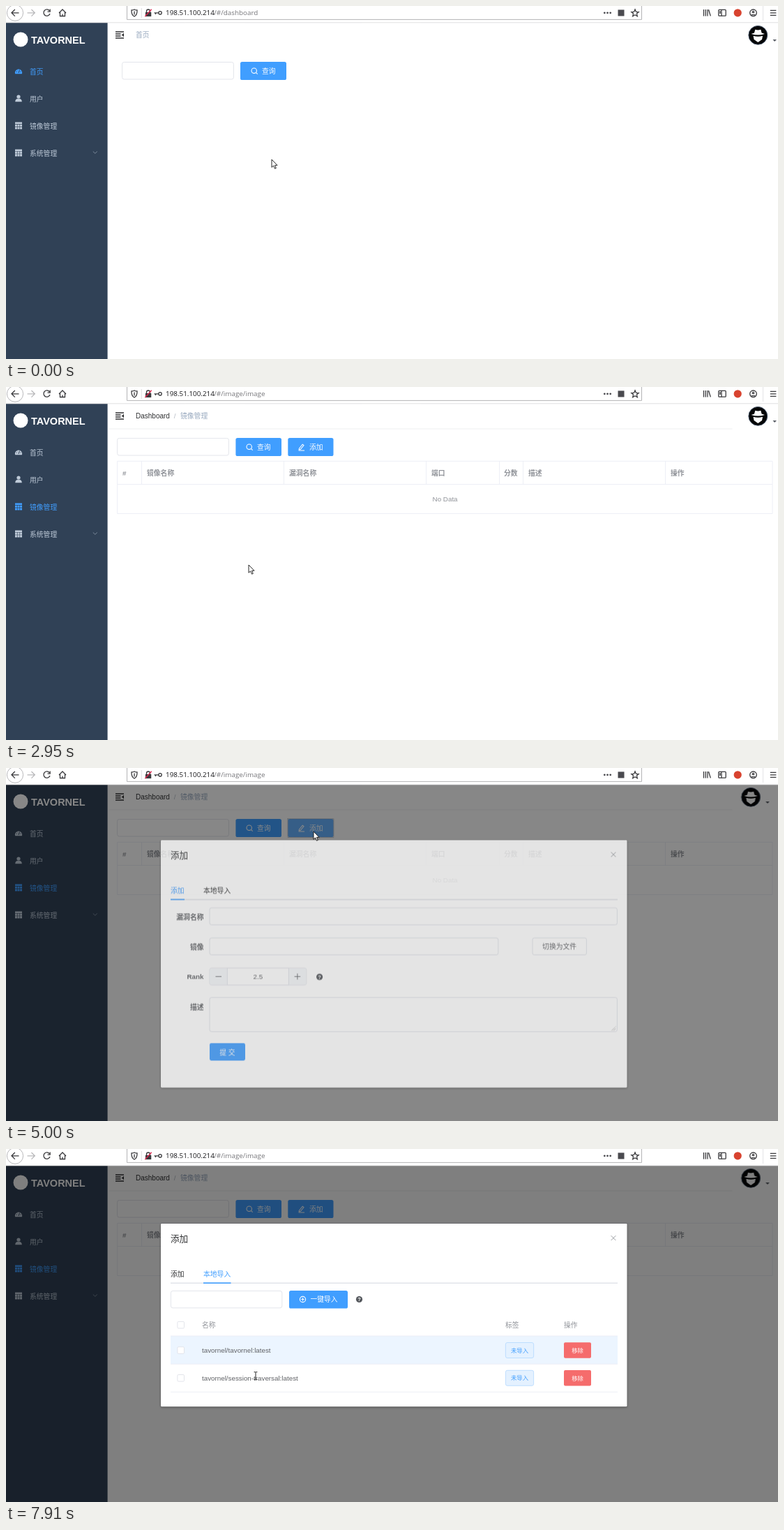
An HTML page that plays this animation: 1107x506 px, repeating every 8 s.

```html
<!DOCTYPE html>
<html lang="zh">
<head>
<meta charset="utf-8">
<title>镜像管理</title>
<style>
html, body { margin: 0; width: 100%; height: 100%; overflow: hidden; background: #fff; }
svg { display: block; }
text { font: 9.8px "Liberation Sans", "Noto Sans CJK SC", "Noto Sans CJK", sans-serif; fill: currentColor; white-space: pre; }
.url { font: 9.85px "Open Sans", sans-serif; }
.brand { font-size: 14.5px; font-weight: 700; }
.title { font-size: 12.6px; }
.small { font-size: 8.4px; }
.bold text { font-weight: 700; }
.mid { text-anchor: middle; }
.end text { text-anchor: end; }
.line { fill: none; stroke: currentColor; stroke-width: 1.1; }
.box { fill: #fff; stroke: #dcdfe6; stroke-width: .8; }
.btn { fill: #409eff; }
.rule { fill: none; stroke: #ebeef5; stroke-width: .9; }
.fill { fill: currentColor; }
.ink { color: #303133; } .body { color: #606266; } .mute { color: #909399; }
.crumb { color: #97a8be; } .blue { color: #409eff; } .white { color: #fff; }
.menu { color: #bfcbd9; }

/* Every animation is held still and placed by the clock through --now. */
.k { animation: 8s step-end infinite paused; animation-delay: var(--now, 0s); }
.smooth { animation-timing-function: linear; }
.before { animation-name: before; } .after { animation-name: after; }
.lit { animation-name: lit; } .unlit { animation-name: unlit; }
.hover { animation-name: hover; } .load { animation-name: load; }
.leave { animation-name: leave; } .enter { animation-name: enter; }
.crumbIn { animation-name: crumbIn; } .shift { animation-name: shift; }
.add { animation-name: add; } .focus { animation-name: focus; }
.dim { animation-name: dim; } .pop { animation-name: pop; }
.paneA { animation-name: paneA; } .paneB { animation-name: paneB; }
.tabA { animation-name: tabA; } .tabB { animation-name: tabB; }
.bar { animation-name: bar; } .edge { animation-name: edge; } .row { animation-name: row; }
.arrow { animation-name: arrow; } .hand { animation-name: hand; } .beam { animation-name: beam; }

@keyframes before { 0% { opacity: 1 } 25.9%, to { opacity: 0 } }
@keyframes after { 0% { opacity: 0 } 25.9%, to { opacity: 1 } }
@keyframes lit { 0% { color: #bfcbd9 } 25.9%, to { color: #409eff } }
@keyframes unlit { 0% { color: #409eff } 25.9%, to { color: #bfcbd9 } }
@keyframes hover {
  0% { opacity: 0; transform: translateY(-78px) } 8.1% { opacity: 1; transform: translateY(-78px) }
  11% { opacity: 1; transform: translateY(-39px) } 13% { opacity: 1; transform: none }
  28.7%, to { opacity: 0; transform: none }
}
@keyframes load { 0%, 25.9% { opacity: 0 } 25.95%, 26.1% { opacity: 1 } 29%, to { opacity: 0 } }
@keyframes leave {
  0%, 25.9% { opacity: 1; transform: none } 26% { opacity: .62; transform: translateX(8.6px); animation-timing-function: ease-out }
  31%, to { opacity: 0; transform: translateX(30px) }
}
@keyframes enter {
  0%, 31% { opacity: 0; transform: translateX(-21px); animation-timing-function: ease }
  36.8%, to { opacity: 1; transform: none }
}
@keyframes crumbIn {
  0%, 25.9% { opacity: 0; transform: translateX(14px) } 26% { opacity: .45; transform: translateX(8px); animation-timing-function: ease-out }
  30%, to { opacity: 1; transform: none }
}
@keyframes shift { 0% { transform: none } 59.1%, to { transform: translateX(-10.3px) } }
@keyframes add {
  0% { fill: #409eff } 53.7% { fill: #66b1ff } 59.1% { fill: #3a8ee6 }
  60.9% { fill: #66b1ff } 85.6%, to { fill: #409eff }
}
@keyframes focus { 0% { opacity: 0 } 59.1% { opacity: 1 } 85.6%, to { opacity: 0 } }
@keyframes dim { 0%, 59.2% { opacity: 0 } 61% { opacity: .47 } 62%, to { opacity: .5 } }
@keyframes pop {
  0%, 59.2% { opacity: 0; transform: translateY(-14px) }
  61% { opacity: .78; transform: translateY(-3.6px) } 62.5%, to { opacity: 1; transform: none }
}
@keyframes paneA { 0% { opacity: 1 } 87.4%, to { opacity: 0 } }
@keyframes paneB { 0% { opacity: 0 } 87.4%, to { opacity: 1 } }
@keyframes tabA { 0% { color: #409eff } 87.4%, to { color: #303133 } }
@keyframes tabB { 0% { color: #303133 } 87.4%, to { color: #409eff } }
@keyframes bar { 0%, 87.4% { x: 236px; width: 20px } 91%, to { x: 283px; width: 39.5px } }
@keyframes edge { 0% { stroke: #dcdfe6 } 71.8% { stroke: #b8bcc5 } 74.3%, to { stroke: #dcdfe6 } }
@keyframes row { 0% { opacity: 0 } 95.5%, to { opacity: 1 } }
@keyframes arrow {
  0% { opacity: 1 } 8.1% { opacity: 0 } 28.7% { opacity: 1 } 71.2% { opacity: 0 }
  74.3% { opacity: 1 } 84.4% { opacity: 0 } 89.4% { opacity: 1 } 98.1%, to { opacity: 0 }
}
@keyframes hand {
  0% { opacity: 0 } 8.1% { opacity: 1 } 28.7% { opacity: 0 } 84.4% { opacity: 1 } 89.4%, to { opacity: 0 }
}
@keyframes beam { 0% { opacity: 0 } 71.2% { opacity: 1 } 74.3% { opacity: 0 } 98.1%, to { opacity: 1 } }
</style>
</head>
<body>
<svg width="1107" height="506" viewBox="0 0 1107 506">
<defs>
  <path id="grid" class="fill" d="M-5-5H5V-2.6H-5ZM-5-1.9H-2.1V1.2H-5ZM-1.5-1.9H1.5V1.2H-1.5ZM2.1-1.9H5V1.2H2.1ZM-5 1.8H-2.1V5H-5ZM-1.5 1.8H1.5V5H-1.5ZM2.1 1.8H5V5H2.1Z"/>
  <g id="lens" class="line"><circle cx="-.6" cy="-.6" r="3.7"/><path d="M2.1 2.1 4.4 4.4"/></g>
  <g id="help"><circle r="4.6" fill="#55585d"/><text class="mid white" y="2.7" style="font-size:7.5px;font-weight:700">?</text></g>
  <rect id="check" class="box" x="-4.8" y="-4.8" width="9.6" height="9.6" rx="1.4"/>
  <g id="actions">
    <rect x="716.4" y="-11" width="40.2" height="22" rx="2.5" fill="#e4f1ff" stroke="#b3d8ff" stroke-width=".8"/>
    <text class="small blue mid" x="736.5" y="3.1">未导入</text>
    <rect x="800" y="-11.2" width="39" height="22.4" rx="2" fill="#f56c6c"/>
    <text class="small white mid" x="819.5" y="3.2">移除</text>
  </g>
</defs>

<rect width="1107" height="506" fill="#fff"/>

<!-- page header -->
<g class="ink">
  <path class="line" d="M157 37H169M157 40H164.5M157 43H164.5M157 46H169" style="stroke-width:1.3"/>
  <path class="fill" d="M169 38.7V44.3L165.8 41.5Z"/>
</g>
<text class="crumb k before" x="186" y="45.2">首页</text>
<g class="k after">
  <text class="ink" x="186" y="45.2" style="font-size:10px">Dashboard</text>
  <text x="240.8" y="45.2" color="#b5bac4">/</text>
  <path d="M148 60H1041.5" stroke="#eeeff1"/>
</g>
<text class="crumb k smooth crumbIn" x="250" y="45.2">镜像管理</text>
<g class="k shift">
  <circle cx="1078.3" cy="41.8" r="13.4" fill="#050607" stroke="#3d4c5f"/>
  <path fill="#fff" d="M1073 38.5 1074.3 33.8Q1078.3 35.3 1082.3 33.8L1083.6 38.5 1088 40Q1078.3 43 1068.6 40ZM1071.5 42.8Q1078.3 44.6 1085.1 42.8L1084 48 1078.3 52 1072.6 48Z"/>
  <path d="M1099.5 48H1105L1102.2 51Z" fill="#5a5e66"/>
</g>

<!-- dashboard page -->
<g class="k smooth leave">
  <rect class="box" x="166.6" y="80.5" width="159.8" height="24.5" rx="2.8"/>
  <rect class="btn" x="336" y="80" width="66" height="26" rx="2.6"/>
  <use href="#lens" x="356.3" y="93.3" class="white"/>
  <text class="white" x="367" y="96.9">查询</text>
</g>

<!-- image page -->
<g class="k smooth enter">
  <rect class="box" x="159.6" y="73.4" width="159.8" height="24.6" rx="2.8"/>
  <rect class="btn" x="329.4" y="73" width="65.6" height="26" rx="2.6"/>
  <use href="#lens" x="349.3" y="86.3" class="white"/>
  <text class="white" x="360" y="89.9">查询</text>
  <rect class="btn k add" x="404.3" y="73" width="65.2" height="26" rx="2.6"/>
  <rect class="k focus" x="404" y="72.8" width="65.9" height="26.6" fill="none" stroke="#6f7f92" stroke-dasharray="1 1" stroke-width=".8"/>
  <path class="line white" d="M420.5 88 425.2 82.2 427 83.6 422.3 89.3 420.2 89.8ZM419.6 91H428"/>
  <text class="white" x="435" y="89.9">添加</text>
  <path class="rule" d="M159.6 106.3H1099V181.5H159.6ZM159.6 139.5H1099M194.5 106V139.5M398.5 106V139.5M602.5 106V139.5M707.5 106V139.5M741.5 106V139.5M945.5 106V139.5"/>
  <g class="mute bold">
    <text x="167" y="127">#</text><text x="202" y="127.2">镜像名称</text><text x="406" y="127.2">漏洞名称</text>
    <text x="610" y="127.2">端口</text><text x="714" y="127.2">分数</text><text x="749" y="127.2">描述</text><text x="953" y="127.2">操作</text>
  </g>
  <text class="mute mid" x="629.6" y="164.4">No Data</text>
</g>

<!-- sidebar -->
<rect y="24" width="145.6" height="482" fill="#304156"/>
<circle cx="21" cy="48" r="10.5" fill="#fff"/>
<text class="brand white" x="36" y="53.8">TAVORNEL</text>
<rect class="k hover" y="152.2" width="145.6" height="39" fill="#263445"/>
<g class="k unlit">
  <path class="fill" d="M13.2 97.3A5.1 5.1 0 1 1 22.8 97.3Z"/>
  <path d="M18 96 19.5 91.5M14.8 94.3H15.9M20.4 94.3H21.5M15.8 91.5 16.6 92.3" stroke="#304156"/>
  <text x="34" y="97.5">首页</text>
</g>
<g class="menu">
  <circle class="fill" cx="18" cy="130" r="2.6"/>
  <path class="fill" d="M13.2 137.2Q13.2 132.8 18 132.8T22.8 137.2Z"/>
  <text x="34" y="136.5">用户</text>
  <use href="#grid" x="18" y="210.5"/><text x="34" y="214.6">系统管理</text>
  <path class="line" d="M124.8 208.5 127.8 211.3 130.8 208.5" opacity=".6" style="stroke-width:.9"/>
</g>
<g class="k lit"><use href="#grid" x="18" y="171.6"/><text x="34" y="175.6">镜像管理</text></g>

<rect class="k smooth dim" y="24" width="1107" height="482" fill="#000"/>

<!-- dialog -->
<g class="k smooth pop">
  <g class="k paneA">
    <rect x="222" y="107" width="668.5" height="354.7" rx="1.4" fill="#fff" style="filter:drop-shadow(0 1px 1.5px #0006)"/>
    <g class="body bold end">
      <text x="283.5" y="220.6">漏洞名称</text><text x="283.5" y="263.6">镜像</text>
      <text x="283.5" y="306.4">Rank</text><text x="283.5" y="350">描述</text>
    </g>
    <rect class="box k edge" x="292" y="204" width="584.4" height="24.4" rx="2.8"/>
    <rect class="box" x="292" y="247.2" width="413.8" height="24.2" rx="2.8"/>
    <rect class="box" x="755" y="247.2" width="77.4" height="24.2" rx="2.4"/>
    <text class="body mid" x="793.6" y="263.3">切换为文件</text>
    <rect class="box" x="292" y="290.3" width="138.8" height="24.4" rx="2.8"/>
    <path d="M292.5 290.8H317.3V314.2H292.5ZM405.4 290.8H430.3V314.2H405.4Z" fill="#f5f7fa"/>
    <path d="M317.4 290.5V314.5M405.4 290.5V314.5" stroke="#dcdfe6" stroke-width=".8"/>
    <path class="line body" d="M300.5 302.5H309M413.6 302.5H422.2M417.9 298.2V306.8" style="stroke-width:.9"/>
    <text class="body mid" x="361.3" y="306.3">2.5</text>
    <use href="#help" x="449.6" y="303"/>
    <rect class="box" x="292" y="332.5" width="584.4" height="49" rx="2.8"/>
    <path d="M868.5 380 874.5 374M871.3 380 874.5 376.8" stroke="#999" stroke-width=".8" stroke-dasharray="1 .6"/>
    <rect class="btn" x="292" y="398" width="51" height="25" rx="2.4"/>
    <text class="white mid" x="317.5" y="414.7">提 交</text>
  </g>
  <g class="k paneB">
    <rect x="222" y="107" width="668.5" height="262.3" rx="1.4" fill="#fff" style="filter:drop-shadow(0 1px 1.5px #0006)"/>
    <rect class="box" x="236.4" y="203.4" width="159.4" height="24.4" rx="2.8"/>
    <rect class="btn" x="406" y="203" width="84" height="25.5" rx="2.6"/>
    <g class="line white"><circle cx="425.5" cy="215.5" r="4.1"/><path d="M423.3 215.5H427.7M425.5 213.3V217.7"/></g>
    <text class="white" x="436.4" y="219.2">一键导入</text>
    <use href="#help" x="506.5" y="215.5"/>
    <g class="mute"><text x="281" y="255.5">名称</text><text x="716" y="255.5">标签</text><text x="800" y="255.5">操作</text></g>
    <rect class="k row" x="236" y="268" width="641" height="40" fill="#ecf5ff"/>
    <path class="rule" d="M236 268H877M236 308.3H877M236 348.3H877"/>
    <use href="#check" x="250.7" y="252.2"/><use href="#check" x="250.7" y="288.5"/><use href="#check" x="250.7" y="328.3"/>
    <g class="body"><text x="281" y="292">tavornel/tavornel:latest</text><text x="281" y="331.8">tavornel/session-traversal:latest</text></g>
    <use href="#actions" y="288.5"/><use href="#actions" y="328.3"/>
  </g>
  <text class="title ink" x="236" y="133.2">添加</text>
  <path class="line mute" d="M867.6 124.2 874.4 131M874.4 124.2 867.6 131" style="stroke-width:.9"/>
  <rect x="236" y="191.5" width="641" height="1.4" fill="#dfe2e8"/>
  <rect class="btn k smooth bar" x="236" y="191.3" width="20" height="1.6"/>
  <text class="k tabA" x="236" y="183">添加</text>
  <text class="k tabB" x="283" y="183">本地导入</text>
</g>

<!-- browser toolbar -->
<rect width="1107" height="24" fill="#fff"/>
<path d="M0 23.8H1107" stroke="#dcdcdd" stroke-width=".9"/>
<rect class="k smooth load" y="23.6" width="1038" height="2" fill="#3aa0dc"/>
<g class="line" color="#3a3a3d" style="stroke-width:1.3">
  <circle cx="13" cy="9.8" r="11.6" stroke="#b8b8ba" stroke-width="1"/>
  <path d="M18.5 9.8H8.5M12.8 5 8 9.8 12.8 14.6"/>
  <path d="M30.5 9.8H41M36.5 5 41.3 9.8 36.5 14.6" stroke="#b9b9bb"/>
  <path d="M62.3 6.8A4.6 4.6 0 1 0 63 11M63.2 4.5V8.2H59.5"/>
  <path d="M76 10 81 5 86 10M77.5 9V14.5H84.5V9M81 14.5V11.5"/>
  <path d="M173.5 0V19.4H911.5V0" stroke="#b4b4b6" stroke-width="1"/>
  <path d="M180 6Q182.5 6 184 5 185.5 6 188 6 188.3 13 184 15 179.7 13 180 6ZM184 7.5V12.5"/>
  <path d="M194.3 3V17" stroke="#d4d4d6" stroke-width=".8"/>
  <path d="M201.5 9.5V7.5Q201.5 5 204 5T206.5 7.5V9.5"/>
  <rect x="200.6" y="9.5" width="7" height="4.8" fill="#3a3a3d"/>
  <path d="M199.3 15 208.8 4.8" stroke="#e22850"/>
  <circle cx="221" cy="9.8" r="2.2"/><path d="M218.8 9.8H212.5M214.5 9.8V12"/>
  <path d="M902 4.8 903.5 8.3 907.2 8.6 904.4 11 905.3 14.7 902 12.7 898.7 14.7 899.6 11 896.8 8.6 900.5 8.3Z"/>
  <path d="M1000.5 5V14.5M1003.3 5V14.5M1006 5V14.5M1007.5 5.2 1010.3 14.4"/>
  <rect x="1021.8" y="5.4" width="10.4" height="8.8" rx="1"/><path d="M1026 5.4V14.2M1023 8H1025M1023 10H1025"/>
  <circle cx="1071.5" cy="9.8" r="4.8"/><circle cx="1071.5" cy="8.5" r="1.2"/><path d="M1068.8 12.6H1074.2"/>
  <path d="M1085.5 0V21" stroke="#dedee0" stroke-width=".8"/>
  <path d="M1095.8 6.3H1104.4M1095.8 9.8H1104.4M1095.8 13.3H1104.4"/>
</g>
<g fill="#4a4a4f"><circle cx="858.3" cy="9.8" r="1.4"/><circle cx="862.5" cy="9.8" r="1.4"/><circle cx="866.7" cy="9.8" r="1.4"/><rect x="877.5" y="5.4" width="9" height="9"/></g>
<circle cx="1049.2" cy="9.8" r="5.6" fill="#d8432f"/>
<text class="url" x="229" y="13.4" color="#151518">198.51.100.214</text>
<g color="#77777b">
  <text class="url k before" x="298.2" y="13.4">/#/dashboard</text>
  <text class="url k after" x="298.2" y="13.4">/#/image/image</text>
</g>

<!-- pointer -->
<g id="pointer">
  <path class="k arrow" d="M0 0V11.3L2.6 8.9 4.5 13.2 6.3 12.4 4.5 8.3H8Z" fill="#fff" stroke="#111" stroke-width=".9"/>
  <path class="k hand" d="M-1.3.6Q0-.8 1.3.6V5.4Q2.4 4.8 3.3 5.8 4.5 5.2 5.2 6.4 6.8 6.2 7 7.6V11Q7 13.5 5.6 15.6H-.6Q-1.8 13-4 10.2-4.6 8.6-3.2 8.5L-1.3 10Z" fill="#fff" stroke="#111" stroke-width=".8"/>
  <path class="k beam" d="M-2.4-5.3H-.6L0-4.8.6-5.3H2.4M0-4.8V4.8M-2.4 5.3H-.6L0 4.8.6 5.3H2.4" fill="none" stroke="#222"/>
</g>
</svg>
<script>
const LOOP = 8000;

// Pointer path: time in ms, x, y
const path = [
  [0, 381, 220], [130, 380, 224], [400, 262, 165], [680, 118, 97], [820, 88, 105], [1090, 77, 183], [1210, 70, 172],
  [2080, 70, 172], [2370, 160, 196], [2660, 300, 240], [2950, 348, 255], [3070, 340, 248], [3490, 246, 215],
  [3770, 320, 160], [4180, 471, 90], [4300, 460, 92], [4420, 441, 91], [4880, 441, 91], [5250, 405, 150],
  [5750, 355, 210], [5900, 350, 208], [6375, 221, 182], [6850, 300, 179], [7000, 300, 179], [7390, 325, 235],
  [7910, 358, 325], [LOOP, 358, 325]
];

// The screen refreshes in bursts: first time, last time, number of refreshes
const bursts = [
  [0, 0, 1], [130, 1090, 8], [1210, 1210, 1], [2080, 2080, 1], [2230, 2800, 5], [2950, 3070, 2], [3220, 4180, 8],
  [4300, 4420, 2], [4730, 4730, 1], [4880, 5750, 8], [5900, 6850, 7], [7000, 7910, 8]
];
const ticks = bursts.flatMap(([from, to, n]) =>
  Array.from({ length: n }, (_, i) => from + (to - from) * i / Math.max(1, n - 1)));

const pointer = document.getElementById('pointer').animate(
  path.map(([t, x, y]) => ({ offset: t / LOOP, transform: `translate(${x}px, ${y}px)` })),
  { duration: LOOP, fill: 'both' });
pointer.pause();

const start = performance.now();
function draw() {
  const time = (performance.now() - start) % LOOP;
  const now = ticks.filter(t => t <= time).pop();
  document.documentElement.style.setProperty('--now', `${-now}ms`);
  pointer.currentTime = now;
  requestAnimationFrame(draw);
}
draw();
</script>
</body>
</html>
```
